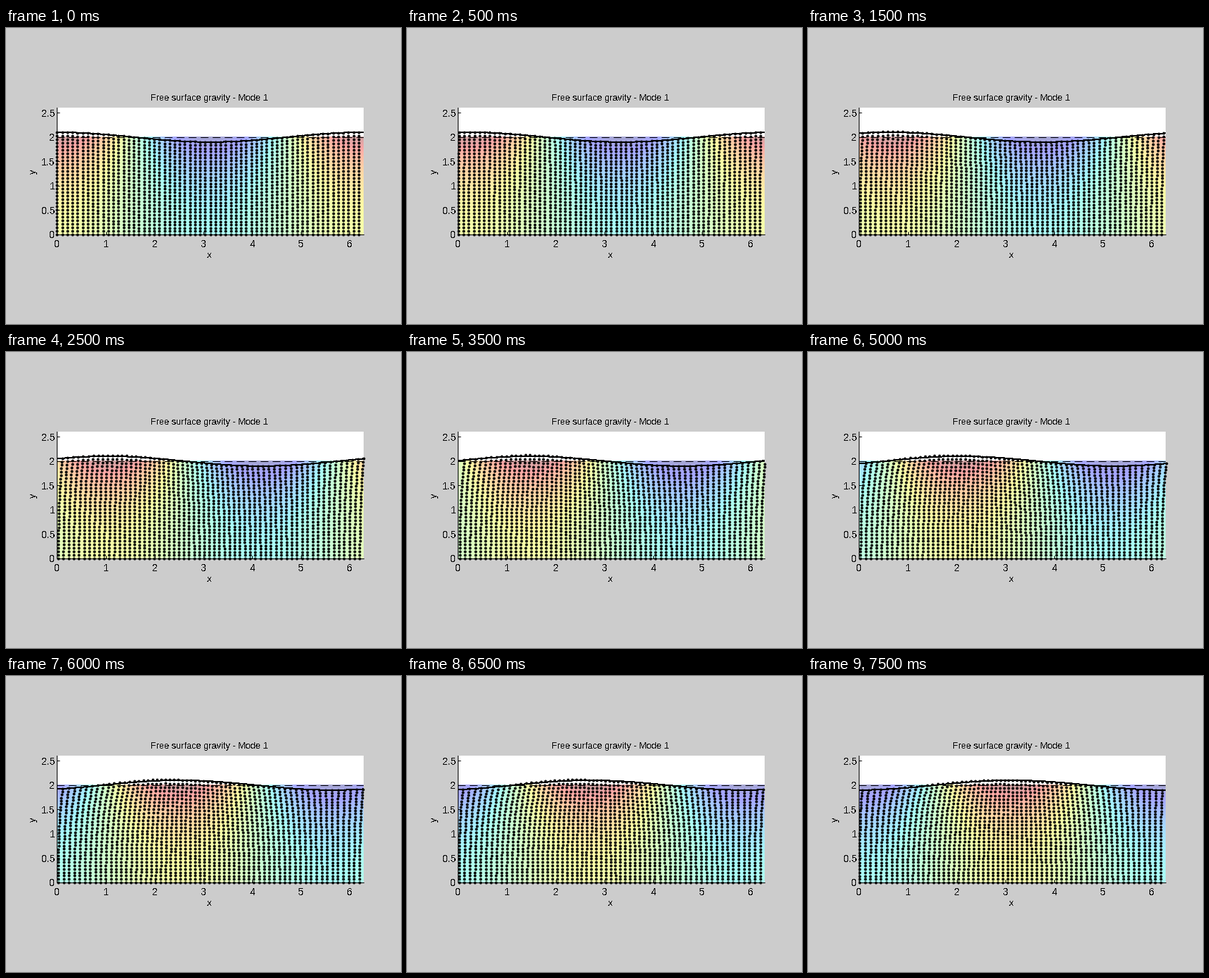
Animation of 560x420 px, one loop 8000 ms. Source, as a matplotlib script:

```python
import numpy as np
import matplotlib.pyplot as plt
from matplotlib.animation import FuncAnimation

W, H, DPI = 560, 420, 80
PX = 72 / DPI                      # one pixel in points
DEPTH, AMP, TOP = 2.0, 0.1, 2.606
FRAMES, STEPS = 16, 30             # frames shown, frames per wave period
COLS, ROWS = 60, 30
TAU = 2 * np.pi
DT = TAU / STEPS

plt.rcParams.update({"font.family": "Liberation Sans", "text.antialiased": False})

fig = plt.figure(figsize=(W / DPI, H / DPI), dpi=DPI, facecolor="#cccccc")
ax = fig.add_axes([72.4 / W, 127 / H, 434.6 / W, 180 / H])
ax.set(xlim=(0, TAU), ylim=(0, TOP))
ax.set_xticks(range(7))
ax.set_yticks(np.arange(0, 2.6, 0.5), ["0", "0.5", "1", "1.5", "2", "2.5"])
ax.tick_params(direction="in", length=4 * PX, width=PX, pad=3 * PX, labelsize=14 * PX)
ax.tick_params(axis="x", pad=7 * PX)
ax.spines[["top", "right"]].set_visible(False)
ax.spines[["left", "bottom"]].set_linewidth(PX)


def label(x, y, s, size, **kw):
    fig.text(x / W, 1 - y / H, s, size=size * PX, ha="center", **kw)


def elevation(x, phase):
    return AMP * np.cos(x - phase)


def drift(rows, cols):
    """Particle positions per frame, stepped through the wave's velocity field."""
    x, s = np.meshgrid(np.arange(cols) * TAU / cols, np.linspace(0, 1, rows))
    y = s * (DEPTH + elevation(x, 0))
    path = []
    for i in range(FRAMES):
        path.append((x, y))
        a, k = x - i * DT, AMP / np.sinh(DEPTH)
        x, y = x + DT * k * np.cosh(y) * np.cos(a), y + DT * k * np.sinh(y) * np.sin(a)
    return path


label(288.5, 103, "Free surface gravity - Mode 1", 12.8, va="baseline")
label(288.5, 326, "x", 13, va="baseline")
label(39, 204, "y", 13, va="center", rotation=90)

# pressure field below the rest level
fx = np.linspace(0, TAU, 217)
fy = np.linspace(0, DEPTH, 70)[:, None]
decay = np.cosh(fy) / np.cosh(DEPTH)
field = ax.imshow(decay * np.cos(fx), cmap="jet", vmin=-1, vmax=1, alpha=0.35,
                  extent=(0, TAU, 0, DEPTH), origin="lower", aspect="auto",
                  interpolation="bilinear", zorder=1)

ax.plot([0, TAU], [DEPTH, DEPTH], "k", lw=PX, dashes=(10, 6), antialiased=False, zorder=3)
dots, = ax.plot([], [], "ko", ms=4 * PX, mew=0, clip_on=False, zorder=4)
surface, = ax.plot([], [], "k", lw=PX, antialiased=False, zorder=5)
particles = drift(ROWS, COLS)


def draw(i):
    phase = i * DT
    field.set_data(decay * np.cos(fx - phase))
    x, y = particles[i]
    inside = x <= TAU + 0.01
    dots.set_data(x[inside], y[inside])
    surface.set_data(fx, DEPTH + elevation(fx, phase))
    return field, dots, surface


anim = FuncAnimation(fig, draw, frames=FRAMES, interval=500, repeat=True, repeat_delay=0)
plt.show()
```
